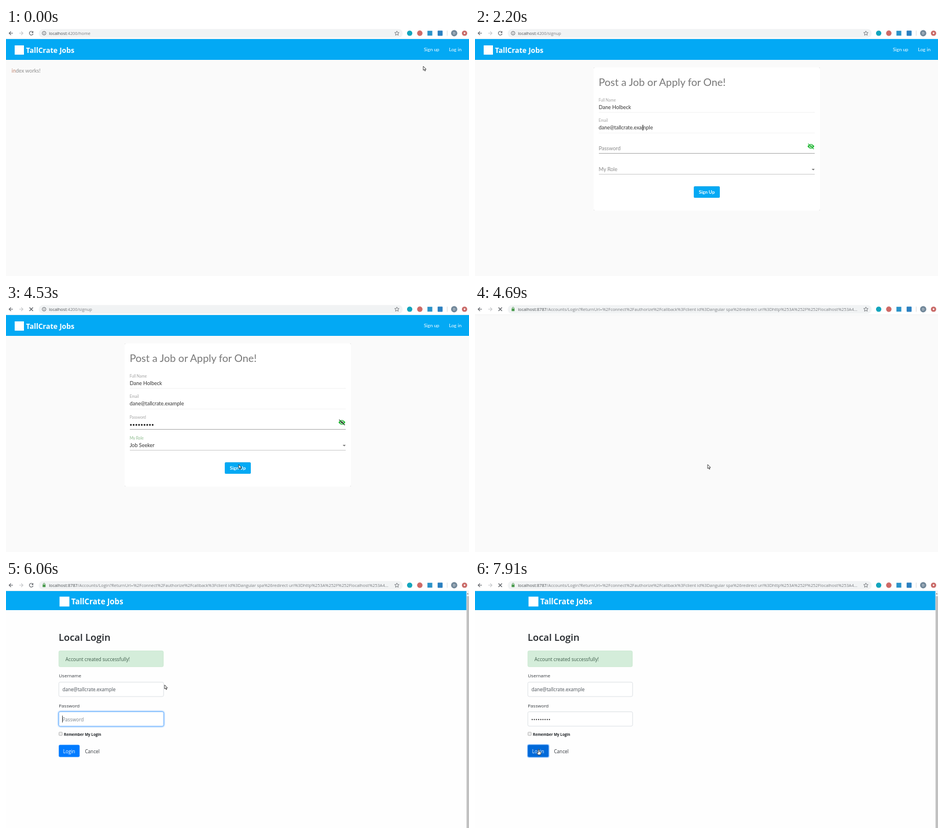
An HTML page that plays this animation: 800x428 px, repeating every 8 s.

```html
<!DOCTYPE html>
<html lang="en">
<head>
<meta charset="utf-8">
<title>Sign up and log in</title>
<style>
html, body { margin: 0; width: 100%; height: 100%; overflow: hidden; background: #fafafa; }
svg { display: block; width: 100vw; height: 100vh; }
text { font: 9px Lato, sans-serif; white-space: pre; }
.ui text, text.ui { font: 8.2px "Open Sans", sans-serif; }
.ui text.url { font-size: 7.3px; fill: #7c7f83; }
.ui text.url tspan { fill: #4c5054; }
.ui text.brand, text.brand { font: 700 12.4px "Open Sans", sans-serif; fill: #fff; }
.ui text.title { font-size: 16.6px; font-weight: 600; fill: #212529; }
.ui text.label { font-size: 8px; fill: #33383d; }
.ui text.tiny { font-size: 6.3px; font-weight: 700; fill: #212529; }
.ui text.mark { font-size: 6px; fill: #fff; }
text.head { font-size: 17.9px; fill: #777; }
text.nav { font-size: 8.3px; fill: #fff; }
text.btn { font-size: 8px; font-weight: 700; fill: #fff; }
text.float { font-size: 6.7px; fill: #a3a3a3; }
text.float.green { fill: #8cba8c; }
text.big { fill: #8a8a8a; }
text.val { fill: #333; }
.icon { fill: none; stroke: #5f6368; stroke-width: 1.1; }
.card { filter: drop-shadow(0 .8px .6px rgba(0,0,0,.38)); }
.raised { filter: drop-shadow(0 1.6px 1.3px rgba(0,0,0,.4)); }
.flat { filter: drop-shadow(0 .6px .6px rgba(0,0,0,.3)); }
.input { fill: #fff; stroke: #ced4da; stroke-width: .7; }
.ring { fill: #fff; stroke: #80bdff; stroke-width: .9; filter: drop-shadow(0 0 .8px #5ba8ff) drop-shadow(0 0 .8px #8cc3ff); }
.dots { fill: none; stroke: #222; stroke-linecap: round; }
#pointer path { stroke: #222; stroke-width: .8; stroke-linejoin: round; fill: #fff; }
</style>
</head>
<body>
<svg viewBox="0 0 800 428">
  <rect width="800" height="428" fill="#fafafa"/>

  <!-- single page app -->
  <g data-on="home signup">
    <rect y="19" width="800" height="36" fill="#03a9f4"/>
    <rect x="15" y="30" width="16" height="16" fill="#fff"/>
    <text class="brand" x="34.5" y="42.5">TallCrate Jobs</text>
    <rect data-on="hover" x="713.5" y="27" width="44" height="21" rx="2" fill="#000" opacity=".05"/>
    <text class="nav" x="735.3" y="40.3" text-anchor="middle">Sign up</text>
    <text class="nav" x="776.3" y="40.3" text-anchor="middle">Log in</text>
  </g>
  <text data-on="home" x="9.8" y="77.3" fill="#8d8d8d"><tspan fill="#c0846f">in</tspan>dex works!</text>

  <g data-on="signup">
    <rect class="card" x="205" y="68" width="391" height="247" rx="2" fill="#fff"/>
    <text class="head" x="213.7" y="100.3">Post a Job or Apply for One!</text>
    <g id="fields"></g>
    <path class="dots" data-on="pass" d="M215.8 208.6H254.5" stroke-width="3.1" stroke-dasharray="0 4.7"/>
    <g transform="translate(580.4 204.2)">
      <path d="M-6 0Q0-8 6 0Q0 8-6 0Z" fill="#27b93a"/>
      <circle r="2.6" fill="#fff"/>
      <circle id="pupil" r="1.6"/>
      <path id="slash" d="M-4.8-4.6L5 4.8" stroke-width="1.3"/>
    </g>
    <path d="M581.8 243h5.2l-2.6 2.7Z" fill="#777"/>
    <g id="submit"><rect x="378" y="273.3" width="45" height="19.7" rx="2"/></g>
    <g data-on="ripple">
      <rect x="389" y="273.3" width="27" height="12.5" fill="#35b7ef"/>
      <ellipse cx="402.5" cy="279" rx="6.5" ry="5.7" fill="#7cc67c"/>
    </g>
    <ellipse data-on="spread" cx="402" cy="283" rx="19" ry="9.6" fill="#fff" opacity=".13"/>
    <text class="btn" x="400.5" y="286" text-anchor="middle">Sign Up</text>
  </g>

  <!-- identity server page -->
  <g class="ui" data-on="login">
    <rect y="18" width="800" height="410" fill="#fefefe"/>
    <rect y="19" width="796" height="33" fill="#03a9f4"/>
    <rect x="92.5" y="28.7" width="17" height="17" fill="#fff"/>
    <text class="brand" x="112.8" y="41.8" style="font-size:13.3px">TallCrate Jobs</text>
    <rect x="795.5" y="19" width="4.5" height="409" fill="#f1f1f1"/>
    <path d="M796.4 24.5h2.8l-1.4-2Z" fill="#666"/>
    <rect x="795.8" y="28" width="4.2" height="400" fill="#c1c1c1"/>
    <text class="title" x="91" y="105.2">Local Login</text>
    <rect x="91.3" y="122.3" width="180.6" height="27.4" rx="2.3" fill="#d4edda" stroke="#c3e6cb" stroke-width=".7"/>
    <text x="102.8" y="139.5" fill="#3d5c4a">Account created successfully!</text>
    <text class="label" x="91.3" y="168.4">Username</text>
    <rect class="input" x="91.3" y="176.3" width="181" height="24.8" rx="2.3"/>
    <rect class="ring" data-on="user" x="91.3" y="176.3" width="181" height="24.8" rx="2.3"/>
    <text x="97.4" y="192.1" fill="#495057">dane@tallcrate.example</text>
    <path data-on="caret1" d="M97.5 182.5v12" stroke="#222" stroke-width=".8"/>
    <text class="label" x="91.3" y="220">Password</text>
    <rect class="input" x="91.3" y="227.4" width="181" height="24.8" rx="2.3"/>
    <rect class="ring" data-on="secret" x="91.3" y="227.4" width="181" height="24.8" rx="2.3"/>
    <text data-off="typed" x="97.4" y="243.5" fill="#7b838a">Password</text>
    <path class="dots" data-on="typed" d="M98.8 240.7H129" stroke-width="2" stroke-dasharray="0 3.72"/>
    <path data-on="caret2" d="M97.5 234v12" stroke="#222" stroke-width=".8"/>
    <rect x="91.6" y="262.7" width="5.6" height="5.6" rx=".7" fill="#eee" stroke="#a0a0a0" stroke-width=".7"/>
    <text class="tiny" x="100" y="269">Remember My Login</text>
    <rect data-on="press" x="90" y="283.2" width="38.6" height="23.6" rx="3.2" fill="#9fcbff"/>
    <rect id="enter" x="91.2" y="284.5" width="36" height="21" rx="2.2"/>
    <text x="109.2" y="298.5" text-anchor="middle" fill="#fff">Login</text>
    <text x="136.4" y="298.5" fill="#33383d">Cancel</text>
  </g>

  <!-- browser toolbar -->
  <g class="ui">
    <rect width="800" height="19" fill="#fff"/>
    <path d="M0 18.6H800" stroke="#e6e8ea" stroke-width=".6"/>
    <path class="icon" d="M12 9H5.5M8.6 5.8L5.4 9l3.2 3.2"/>
    <path class="icon" d="M23 9h6.3M26.2 5.8L29.4 9l-3.2 3.2" style="stroke:#c6c8ca"/>
    <g data-off="load">
      <path class="icon" d="M46.3 7A3.3 3.3 0 1 0 46.8 10"/>
      <path d="M47.2 5v3.4h-3.4Z" fill="#5f6368"/>
    </g>
    <path data-on="load" class="icon" d="M40.6 6l6 6M46.6 6l-6 6" style="stroke-width:1.3"/>
    <rect x="56.5" y="1.8" width="629" height="15" rx="7.5" fill="#f1f3f4"/>
    <g data-on="home signup">
      <circle class="icon" cx="65.8" cy="9" r="3.2" style="stroke-width:.9"/>
      <path d="M65.8 8.5v2.4M65.8 6.7v.9" stroke="#5f6368" stroke-width=".9"/>
    </g>
    <g data-on="blank login">
      <rect x="63.3" y="8" width="5" height="4.2" rx=".5" fill="#4a9a4d"/>
      <path d="M64.3 8V7a1.5 1.5 0 0 1 3 0v1" fill="none" stroke="#4a9a4d" stroke-width=".9"/>
    </g>
    <text class="url" data-on="home" x="74.2" y="11.8"><tspan>localhost</tspan>:4200/home</text>
    <text class="url" data-on="signup" x="74.2" y="11.8"><tspan>localhost</tspan>:4200/signup</text>
    <text class="url" data-on="blank login" x="74.2" y="11.8" style="font-size:7.36px"><tspan>localhost:8787</tspan>/Accounts/Login?ReturnUrl=%2Fconnect%2Fauthorize%2Fcallback%3Fclient id%3Dangular spa%26redirect uri%3Dhttp%253A%252F%252Flocalhost%253A4...</text>
    <path class="icon" d="M675.4 5.2l1.1 2.5 2.7.3-2 1.8.6 2.7-2.4-1.4-2.4 1.4.6-2.7-2-1.8 2.7-.3Z" style="stroke-width:.8"/>
    <circle cx="697.5" cy="9" r="4.6" fill="#12a5bd"/>
    <circle cx="715" cy="9" r="4.7" fill="#cf6a66"/>
    <rect x="728.2" y="4.8" width="8.4" height="8.4" fill="#2a93c9"/>
    <rect x="745.8" y="4.6" width="8.6" height="8.8" rx="1" fill="#2a7fc0"/>
    <path d="M762.3 4.5v9" stroke="#cdd0d3" stroke-width=".8"/>
    <circle cx="774.4" cy="9" r="5.4" fill="#72889a"/>
    <text class="mark" x="774.4" y="11.2" text-anchor="middle">D</text>
    <circle cx="792.3" cy="9" r="4.6" fill="#c96a68"/>
    <circle cx="792.3" cy="9" r="1.4" fill="#fff"/>
  </g>

  <g id="pointer">
    <path data-on="arrow" d="M0 0V7L1.6 5.6 2.8 8.2 3.9 7.7 2.8 5.2H5Z"/>
    <path data-on="hand" d="M-.9 .8Q0-.6 .9 .8V4L3.6 4.8Q4.4 5.2 4 7.2L3.2 9.8H-1.2L-3 6.6Q-2.8 5.6-.9 6.4Z"/>
    <path data-on="beam" d="M-1.4-4H1.4M0-4V4M-1.4 4H1.4"/>
  </g>
</svg>
<script>
const $ = id => document.getElementById(id);

// key, label, value, text baseline, underline y, underline colour
const fields = [
  ["name", "Full Name", "Dane Holbeck", 139.7, 145.6, "#ececec"],
  ["mail", "Email", "dane@tallcrate.example", 175.3, 181.2, "#f0f0f0"],
  ["pass", "Password", "", 211, 216.4, "#949494"],
  ["role", "My Role", "Job Seeker", 246.8, 252.4, "#bdbdbd"]
];
$("fields").innerHTML = fields.map(([key, label, value, y, line, color]) => `
  <path d="M214 ${line}H587" stroke="${color}" stroke-width=".8"/>
  <text class="big" data-off="${key}" x="213.7" y="${y}">${label}</text>
  <text class="float${key === "role" ? " green" : ""}" data-on="${key}" x="213.7" y="${y - 13}">${label}</text>
  <text class="val" data-on="${key}" x="213.7" y="${y}">${value}</text>`).join("");

// start in ms, pointer x, pointer y, active states
const form = "signup name mail pass role ";
const steps = [
  [0, 721, 66, "home arrow"],
  [150, 722, 61, "home arrow"],
  [310, 725, 52, "home arrow"],
  [470, 728, 43, "home hand hover"],
  [630, 729, 39.5, "home hand hover"],
  [950, 729, 39.5, "signup hand hover pale"],
  [1260, 650, 72, "signup arrow pale"],
  [1417, 480, 102, "signup arrow"],
  [1573, 345, 128, "signup arrow"],
  [1730, 290, 137, "signup beam"],
  [2040, 290, 137, "signup beam name"],
  [2198, 290, 172, "signup beam name mail"],
  [2355, 290, 208, "signup beam name mail pass"],
  [2512, 300, 238, form + "hand"],
  [2670, 320, 243, form + "arrow"],
  [3280, 402, 277, form + "hand lift ripple"],
  [3450, 402, 277, form + "hand lift spread"],
  [3610, 402, 277, form + "hand load"],
  [4240, 402, 277, form + "arrow load"],
  [4690, 402, 277, "blank arrow load"],
  [5010, 366, 217, "login arrow user caret1"],
  [5130, 333, 206, "login arrow user caret1"],
  [5430, 290, 187, "login arrow user caret1"],
  [5590, 274, 181, "login arrow user"],
  [5910, 274, 181, "login arrow secret"],
  [6060, 274, 181, "login arrow secret caret2"],
  [6520, 274, 181, "login arrow secret"],
  [6980, 274, 181, "login arrow secret typed"],
  [7135, 238, 207, "login arrow secret typed"],
  [7290, 180, 248, "login arrow secret typed"],
  [7445, 130, 281, "login arrow secret typed"],
  [7600, 110, 292, "login hand typed secret dark"],
  [7755, 110, 292, "login hand typed press dark"],
  [7910, 110, 292, "login hand typed press dark load"]
];

const parts = [...document.querySelectorAll("[data-on], [data-off]")];
let shown;

function show([, x, y, states]) {
  const active = new Set(states.split(" "));
  for (const part of parts) {
    const { on, off } = part.dataset;
    const visible = on ? on.split(" ").some(s => active.has(s)) : !active.has(off);
    part.style.display = visible ? "" : "none";
  }
  $("pointer").setAttribute("transform", `translate(${x} ${y})`);
  $("submit").setAttribute("fill", active.has("pale") ? "#24b1f5" : "#03a9f4");
  $("submit").setAttribute("class", active.has("lift") ? "raised" : "flat");
  $("enter").setAttribute("fill", active.has("dark") ? "#0069d9" : "#007bff");
  const ink = active.has("pass") ? "#1d3a20" : "#27b93a";
  $("pupil").setAttribute("fill", ink);
  $("slash").setAttribute("stroke", ink);
}

function tick() {
  const time = performance.now() % 8000;
  const step = steps.findLast(s => s[0] <= time);
  if (step !== shown) show(shown = step);
  requestAnimationFrame(tick);
}
tick();
</script>
</body>
</html>
```
